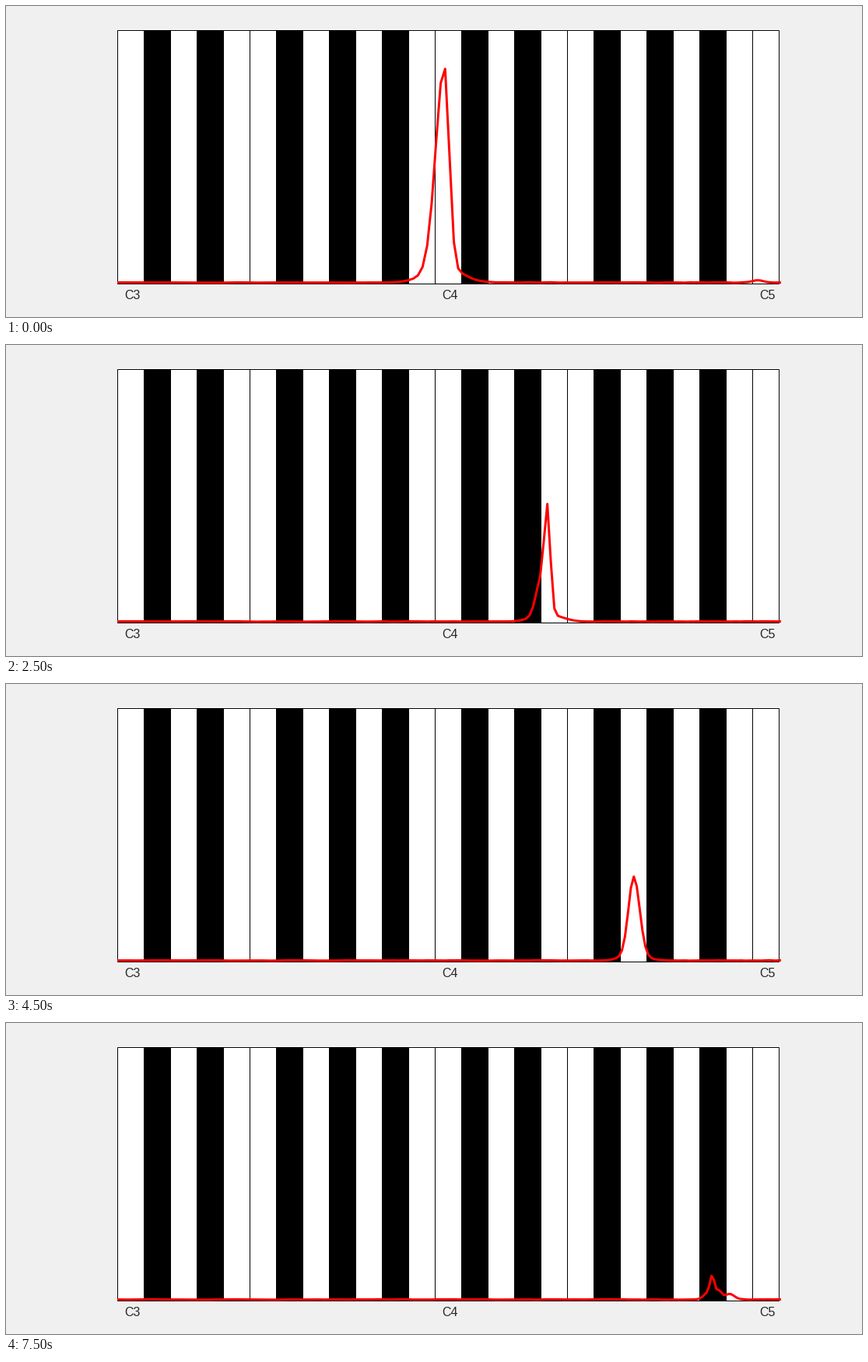
Animation, 1100 px wide and 400 px high, one loop 8 s. Source, as a matplotlib script:

```python
import numpy as np
import matplotlib.pyplot as plt
from matplotlib.animation import FuncAnimation
from matplotlib.patches import Rectangle

W, H, DPI = 1100, 400, 100
PX = 72 / DPI
LEFT, RIGHT, TOP, BASE = 143, 995.5, 30, 356
KEY = 34
OCTAVE = 12 * KEY
BLACK_KEYS = {1, 3, 6, 8, 10}

# Spectrum bins are 2.5 Hz apart, drawn on a pitch axis of 34 px per semitone.
BINS = np.arange(50, 218)
XS = 568 + OCTAVE * np.log2(2.5 * BINS / 261.63)

# Each held note: bin, width below, width above, loudness every half second.
NOTES = [
    (103.8, 1.9, 1.1, [279, 228, 22]),
    (130, 0.8, 0.85, [18, 113, 131, 88]),
    (157, 1.8, 2.0, [27, 91, 108, 50]),
    (184.3, 1.5, 0.9, [0, 130, 94, 105, 8]),
]
# Wavering pitch adds side peaks at some steps: bin, height, width.
WAVER = {
    3: [(133.3, 34, 0.9), (140, 25, 3.2)],
    5: [(128.2, 46, 1.4)],
    7: [(161, 5, 5)],
    11: [(193.7, 11.5, 4.4)],
    13: [(187, 48, 0.9)],
    15: [(186.3, 30, 0.9), (189, 11, 1.2), (193.5, 7, 2)],
}


def bump(mid, height, left, right=None):
    """Bell curve that may have its own width on each side."""
    d = BINS - mid
    return height * np.exp(-0.5 * (d / np.where(d < 0, left, right or left)) ** 2)


def tone(mid, height, left, right):
    """Sharp peak on a soft skirt, with a faint octave above."""
    return (bump(mid, 0.93 * height, left, right) + bump(mid, 0.07 * height, 4)
            + bump(2 * mid - 2, 0.011 * height, 2.2))


LEVELS = [tone(mid, loud, left, right)
          for mid, left, right, louds in NOTES for loud in louds]


def curve(i):
    noise = np.random.default_rng(40 + i).random(len(BINS) + 2)
    level = LEVELS[i] + 0.8 * np.convolve(noise, np.ones(3) / 3, "valid")
    return BASE - level - sum(bump(*peak) for peak in WAVER.get(i, []))


fig = plt.figure(figsize=(W / DPI, H / DPI), dpi=DPI, facecolor="#f0f0f0")
ax = fig.add_axes([0, 0, 1, 1])
ax.set_xlim(0, W)
ax.set_ylim(H, 0)
ax.axis("off")

ax.add_patch(Rectangle((LEFT, TOP), RIGHT - LEFT, BASE - TOP, fc="white", lw=0))
for k in range(25):
    fill = "black" if k % 12 in BLACK_KEYS else "white"
    ax.add_patch(Rectangle((LEFT - 0.5 + KEY * k, TOP + 0.5), KEY, BASE - TOP,
                           fc=fill, ec="black", lw=PX))
for octave in range(3):
    ax.text(152 + OCTAVE * octave, 377, f"C{octave + 3}", ha="left",
            va="baseline", family="Liberation Sans", size=16 * PX,
            color="#262626")

line, = ax.plot(XS, curve(0), color="red", lw=3 * PX,
                solid_joinstyle="round", zorder=3)
line.set_clip_path(Rectangle((LEFT, 0), RIGHT - LEFT, H,
                             transform=ax.transData))


def draw(i):
    line.set_ydata(curve(i))
    return line,


anim = FuncAnimation(fig, draw, frames=len(LEVELS), interval=500, repeat=True,
                     repeat_delay=0, init_func=lambda: draw(0))
plt.show()
```
